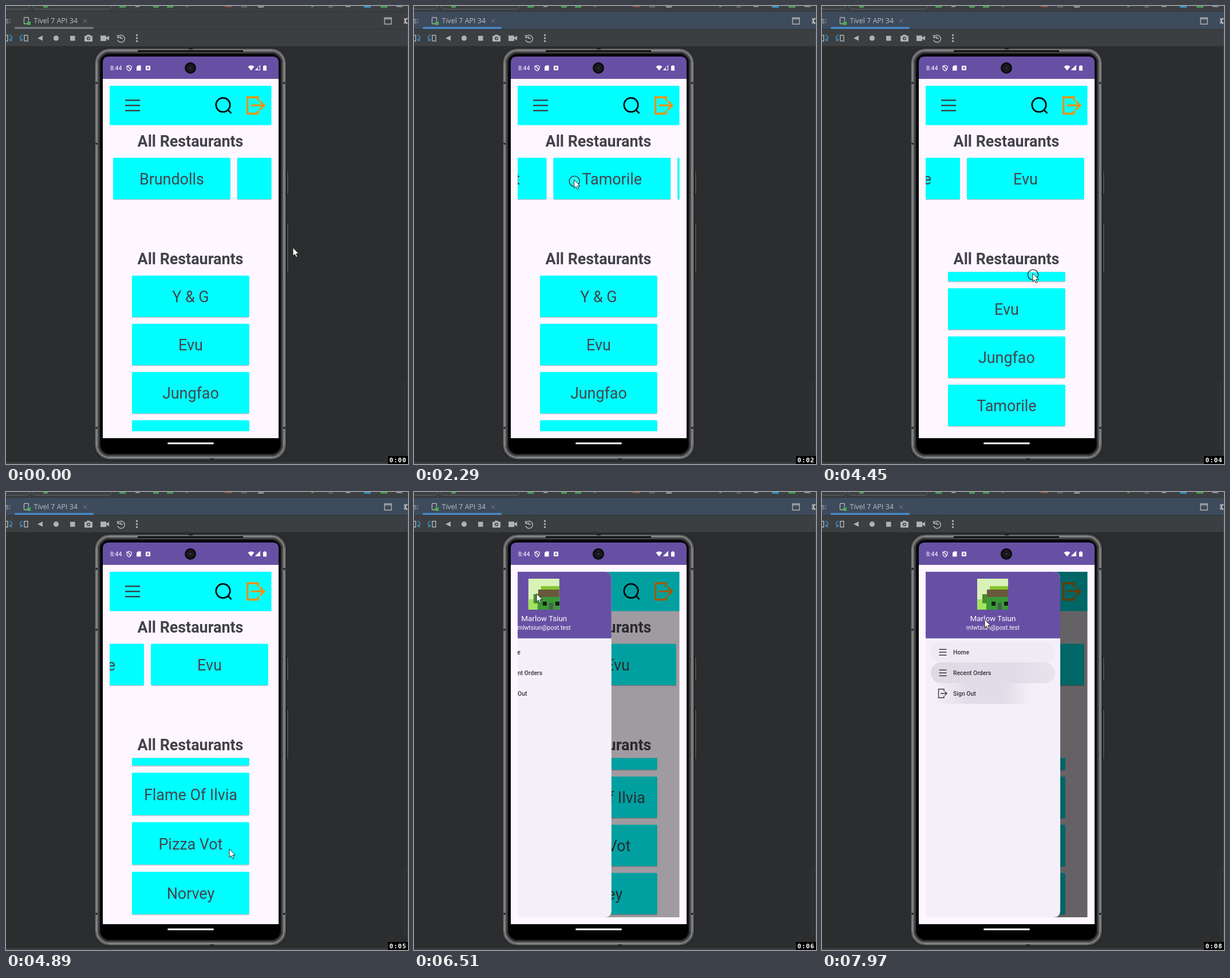
An HTML page that plays this animation: 702 by 798 pixels, repeating every 8 s.

```html
<!DOCTYPE html>
<html lang="en">
<head>
<meta charset="utf-8">
<title>Restaurant app</title>
<style>
html, body { margin: 0; width: 100%; height: 100%; overflow: hidden; background: #2b2d2f; }
svg { display: block; width: 702px; height: 798px; font-family: Roboto, sans-serif; }
.ide { font: 12.5px "Open Sans", sans-serif; fill: #bbbdbf; }
.head { font-weight: 700; font-size: 26.86px; text-anchor: middle; fill: #434249; }
.card text { font-size: 26.86px; text-anchor: middle; fill: #45444c; }
.menu { font-weight: 500; font-size: 10.45px; fill: #37343d; }
.clock { font: bold 11px "DejaVu Sans Mono", monospace; letter-spacing: .9px; fill: #fff; }
.line { fill: none; }
</style>
</head>
<body>
<svg viewBox="0 0 702 798" xmlns="http://www.w3.org/2000/svg">
  <defs>
    <clipPath id="rowClip"><rect x="181" y="262" width="282.5" height="77"/></clipPath>
    <clipPath id="colClip"><rect x="181" y="463.5" width="282.5" height="277.5"/></clipPath>
    <clipPath id="appClip"><rect x="181" y="139" width="282.5" height="602"/></clipPath>
    <linearGradient id="glow">
      <stop offset="0" stop-color="#e1dce7" stop-opacity="0"/>
      <stop offset=".35" stop-color="#e1dce7"/>
      <stop offset=".72" stop-color="#e1dce7"/>
      <stop offset="1" stop-color="#e1dce7" stop-opacity="0"/>
    </linearGradient>
    <linearGradient id="pill">
      <stop offset="0" stop-color="#dfdae4"/>
      <stop offset=".7" stop-color="#e1dce7"/>
      <stop offset="1" stop-color="#e8e3ed"/>
    </linearGradient>
  </defs>

  <!-- editor chrome -->
  <rect width="702" height="798" fill="#2b2d2f"/>
  <rect width="702" height="70" fill="#3c3f41"/>
  <g id="crumbs"></g>
  <g class="line" stroke="#626568">
    <path d="M-5 5.500H36Q40.500 5.500 40.500 0M47.500 0Q47.500 5.500 52 5.500H179Q183.500 5.500 183.500 0"/>
  </g>
  <rect id="bar" y="10" width="702" height="30"/>
  <path d="M0 9.500H702M0 40.500H702" stroke="#323436"/>
  <rect id="under" x="15" y="36.500" width="138" height="3.500" rx="1.700"/>
  <text class="ide" x="-1" y="30">s:</text>
  <text class="ide" x="48.500" y="30">Tivel 7 API 34</text>
  <path d="M134.500 22.500l7 7m0-7l-7 7" stroke="#7b7e81"/>
  <g class="line" stroke="#afb1b3" stroke-width="1.400">
    <path d="M37 31H32.500Q31.500 31 31.500 30V21Q31.500 20 32.500 20H38.500Q39.500 20 39.500 21V26"/>
    <path d="M661 20.500H673V31.500H661ZM661 22.500H673"/>
  </g>
  <rect x="37" y="27" width="6" height="6" rx="1" fill="#4caf50"/>
  <circle cx="701" cy="26" r="4" class="line" stroke="#afb1b3" stroke-width="3"/>
  <path d="M695 22l4 2M695 30l4-2" stroke="#afb1b3" stroke-width="2"/>
  <g class="line" stroke="#afb1b3" stroke-width="1.500">
    <path d="M-3 51H3V61H-3"/>
    <path d="M32 51H38V61H32Z"/>
    <path d="M195 50V55H200M195.500 54A6.300 6.300 0 1 1 195 59M200.500 53V56.500H204"/>
    <path d="M6 51Q11 52 10 57L7 60M29 51Q24 52 25 57L28 60M24 60H28V56M11 60H7V56" stroke="#3592c4"/>
  </g>
  <g fill="#afb1b3">
    <path d="M55 56L64 51.500V60.500Z"/>
    <circle cx="87.500" cy="56" r="4.600"/>
    <rect x="112" y="52" width="8.500" height="8.500"/>
    <path d="M137 52H140L141.500 50H146.500L148 52H151V62H137ZM165 51.500H175V55L180 52V60L175 57V61H165Z"/>
    <circle cx="228.500" cy="50.800" r="1.700"/><circle cx="228.500" cy="56" r="1.700"/><circle cx="228.500" cy="61.200" r="1.700"/>
  </g>
  <circle cx="144" cy="56.500" r="3" fill="#3c3f41"/><circle cx="144" cy="56.500" r="1.500" fill="#afb1b3"/>
  <path d="M702 655.500H698Q695.500 655.500 695.500 658V768Q695.500 770.500 698 770.500H702" fill="#2c2e30" stroke="#3a3c3e"/>
  <rect y="795" width="702" height="3" fill="#3c3f41"/>
  <path d="M701.500 10V798" stroke="#46494b"/>

  <!-- phone -->
  <path d="M491.500 286V329M491.500 378V467" stroke="#111" stroke-width="4"/>
  <path d="M492 287V328M492 379V466" stroke="#6b6c6e" stroke-width="1.500"/>
  <rect x="154.500" y="73.500" width="335" height="717" rx="25" fill="#000" stroke="#1d1d1e" stroke-width="1"/>
  <g class="line">
    <rect x="156" y="75" width="332" height="714" rx="24" stroke="#58595b" stroke-width="2"/>
    <rect x="158.500" y="77.500" width="327" height="709" rx="22" stroke="#838486" stroke-width="3"/>
    <rect x="161.500" y="80.500" width="321" height="703" rx="19" stroke="#48494b" stroke-width="3"/>
    <rect x="164" y="83" width="316" height="698" rx="17" stroke="#1c1c1d" stroke-width="2"/>
  </g>
  <path d="M230 78.500H414" stroke="#101011" stroke-width="3"/>
  <path d="M319 74.500H326M357 789.500H363M156 134H160M484 134H488M156 240H160M156 735H160M484 735H488" stroke="#242426" stroke-width="3"/>
  <path d="M169 127V98Q169 88 179 88H466Q476 88 476 98V127Z" fill="#6750a4"/>
  <rect x="169" y="127" width="307" height="626" fill="#fef7ff"/>
  <rect x="282" y="760.500" width="81" height="3" rx="1.500" fill="#fff"/>
  <circle cx="322" cy="108" r="10" fill="#0b0a0d"/>
  <circle cx="322" cy="108" r="6" fill="#17171b" stroke="#2b2b30"/>
  <circle cx="322" cy="108" r="2" fill="#303240"/>
  <text x="182" y="111.700" font-size="10.600" fill="#fff">8:44</text>
  <path d="M215 103.500L219 105V108Q219 111 215 113Q211 111 211 108V105ZM212 104.500L218 111" class="line" stroke="#fff" stroke-width="1.200"/>
  <path d="M230.500 103.500H235.500V112.500H228V106Z" fill="#fff"/>
  <rect x="244" y="104" width="8" height="8" rx="1" fill="#fff"/>
  <path d="M246 110.500L248 105.500L250 110.500M246.800 109H249.200" class="line" stroke="#6750a4"/>
  <path d="M422.500 105.500Q428 101.500 433.500 105.500L428 112.500Z" fill="#fff"/>
  <path d="M435.500 111.500H443.500V103.500Z" class="line" stroke="#fff"/>
  <path id="signal" fill="#fff"/>
  <path d="M449 104.500H450.500V103.500H453.500V104.500H455V112.500H449Z" fill="#fff"/>

  <!-- app -->
  <rect x="181" y="139" width="282.500" height="68.500" fill="#0ff"/>
  <path d="M208 164.300H234M208 173.300H234M208 182.300H234" stroke="#3a474d" stroke-width="2.500"/>
  <g class="line" stroke="#000" stroke-width="2.700">
    <circle cx="379" cy="172.300" r="12.200"/><path d="M387.500 181L393.500 187"/>
  </g>
  <path d="M440 165.500V159H421.700V187.500H440V181.500M428 173.200H450M443.500 166L450.700 173.200L443.500 180.500" class="line" stroke="#ff9100" stroke-width="3.300"/>
  <text class="head" x="322" y="245.300">All Restaurants</text>
  <text class="head" x="322" y="450.300">All Restaurants</text>
  <g clip-path="url(#rowClip)"><g id="row"></g></g>
  <g clip-path="url(#colClip)"><g id="col"></g></g>

  <!-- drawer -->
  <g clip-path="url(#appClip)">
    <rect id="scrim" x="181" y="139" width="283" height="602"/>
    <g id="drawer">
      <path d="M181 139H404Q416 139 416 151V729Q416 741 404 741H181Z" fill="#f4f0f9"/>
      <path d="M181 139H404Q416 139 416 151V255H181Z" fill="#6750a4"/>
      <g id="avatar"></g>
      <text x="298.500" y="224.700" font-size="13.430" text-anchor="middle" fill="#fff">Marlow Tsiun</text>
      <text x="298.500" y="240.300" font-size="10.450" text-anchor="middle" fill="#fff">mlwtsiun@post.test</text>
      <rect id="home" x="190" y="261" width="217" height="36" rx="18" fill="#e1dce7"/>
      <rect id="recent" x="190" y="297" width="217" height="36" rx="18" fill="url(#pill)"/>
      <rect id="out" x="196" y="333" width="170" height="36" fill="url(#glow)"/>
      <path d="M204.500 274.200H217.500M204.500 279.200H217.500M204.500 284.200H217.500M204.500 310.200H217.500M204.500 315.200H217.500M204.500 320.200H217.500M213 347V343.500H203.500V358.500H213V355M207 351H218M214.500 347.500L218 351L214.500 354.500" class="line" stroke="#3a3740" stroke-width="1.400"/>
      <text class="menu" x="229" y="283">Home</text>
      <text class="menu" x="229" y="319">Recent Orders</text>
      <text class="menu" x="229" y="355">Sign Out</text>
    </g>
  </g>

  <g id="cursor">
    <circle id="ring" cx=".5" cy="2.500" r="9" fill="#fff" fill-opacity=".15" stroke="#222" stroke-width="1.200"/>
    <path d="M0 0V14.500L3.300 11.500L5.700 16.700L8 15.600L5.700 10.700H10.300Z" fill="#fff" stroke="#111" stroke-width=".9"/>
  </g>
  <rect x="667" y="784" width="35" height="14" fill="#000"/>
  <text id="clock" class="clock" x="669.500" y="795"></text>
</svg>
<script>
const LOOP = 8000;
const $ = id => document.getElementById(id);
const set = (id, name, value) => $(id).setAttribute(name, value);

const card = (x, y, name) => `<g class="card">
  <rect x="${x}" y="${y + 1.5}" width="204.700" height="72" rx="2" fill="#8d8792" opacity=".5"/>
  <rect x="${x}" y="${y}" width="204.700" height="72" rx="1.500" fill="#0ff"/>
  <text x="${x + 102.4}" y="${y + 46.4}">${name}</text></g>`;
const rects = list => list.map(([x, y, w, h, c]) =>
  `<rect x="${x}" y="${y}" width="${w}" height="${h}" fill="${c}"/>`).join("");

const rowNames = ["Brundolls", "Norvey", "Flame Of Ilvia", "Pizza Vot", "Tamorile", "Evu"];
const colNames = ["Y &amp; G", "Evu", "Jungfao", "Tamorile", "Brundolls", "Flame Of Ilvia", "Pizza Vot", "Norvey"];
$("row").innerHTML = rowNames.map((n, i) => card(187 + i * 216.7, 264.5, n)).join("");
$("col").innerHTML = colNames.map((n, i) => card(220, 469.8 + i * 84, n)).join("");

$("avatar").innerHTML = rects([
  [271, 151, 54, 54, "#d9f2b8"], [271, 187, 18, 18, "#a4e35f"],
  [293, 164, 32, 10, "#85c62f"], [280, 178, 14, 16, "#4b8c2c"],
  [288, 170, 37, 14, "#69593b"], [287, 183, 38, 22, "#3a9a37"],
  [296, 191, 7, 7, "#12200f"], [318, 191, 7, 7, "#12200f"], [307, 193, 7, 12, "#47604f"]
]);
const green = "#499c54", grey = "#8b8d8f", dim = "#5c5f61";
$("crumbs").innerHTML = rects([
  [65, 0, 8, 3, green], [198, 0, 11, 3, green], [226, 0, 7, 2, grey], [257, 0, 10, 3, green],
  [281, 0, 11, 3, green], [313, 0, 6, 2, dim], [382, 0, 13, 2, "#9a4f4d"], [411, 0, 10, 3, dim],
  [440, 0, 10, 3, grey], [533, 0, 4, 2, green], [563, 0, 8, 3, dim], [593, 0, 8, 2, grey],
  [625, 0, 12, 3, "#3592c4"], [654, 0, 12, 3, green], [682, 0, 10, 2, grey]
]);

const ease = {
  lin: p => p,
  soft: p => p * p * (3 - 2 * p),
  out: p => 1 - (1 - p) ** 3,
  settle: p => 1 - (1 - p) ** 5
};
// Keys are [time, value, easing into this key].
function track(keys, t) {
  const i = keys.findIndex(k => k[0] > t);
  if (i === 0) return keys[0][1];
  if (i < 0) return keys[keys.length - 1][1];
  const [t0, a] = keys[i - 1], [t1, b, e] = keys[i];
  return a + (b - a) * ease[e || "soft"]((t - t0) / (t1 - t0));
}

const rowShift = [[700, 0], [960, 216, "lin"], [1380, 272.7, "out"], [1600, 272.7], [1780, 588, "lin"],
  [2150, 690, "out"], [2180, 690], [2440, 972, "lin"], [2800, 1017.5, "out"]];
const colShift = [[4280, 0], [4450, 61, "lin"], [4600, 232, "lin"], [4760, 394, "lin"]];
const stretch = [[4760, 1], [4870, 1.028, "out"], [4910, 1.028], [5250, 1]];
const slide = [[6408, -235], [6893, 0, "settle"]];
const path = [[310, 501, 421], [660, 440, 303], [700, 440, 303], [960, 224, 308, "lin"], [1080, 214, 310, "out"],
  [1400, 214, 310], [1560, 403, 304], [1600, 403, 304], [1780, 88, 300, "lin"], [1960, 210, 301],
  [2120, 400, 302], [2180, 400, 302], [2440, 118, 304, "lin"], [2820, 118, 304], [3340, 363.5, 460],
  [3650, 363.5, 460], [4100, 372, 528], [4280, 372, 528], [4450, 368, 467, "lin"], [4600, 362, 296, "lin"],
  [4650, 362, 296], [4870, 390, 622], [5380, 390, 622], [6120, 214, 181], [6250, 214, 177],
  [6560, 214, 177], [6700, 235, 262], [6860, 260, 312], [7030, 260, 312], [7350, 300, 345],
  [7600, 262, 275], [7830, 300, 355], [7960, 284, 222]];
const pathX = path.map(([t, x, , e]) => [t, x, e]);
const pathY = path.map(([t, , y, e]) => [t, y, e]);
const presses = [[690, 960], [1590, 1780], [2170, 2440], [4250, 4600], [6300, 6400]];

function draw(t) {
  const focused = t >= 700;
  set("bar", "fill", focused ? "#3d4b5c" : "#3c3f41");
  set("under", "fill", focused ? "#4a88c7" : "#747a80");
  set("signal", "d", t < 4000 ? "M435 112L439.500 107.500V112Z" : "M435 112H444V103Z");

  set("row", "transform", `translate(${-track(rowShift, t)})`);
  const s = track(stretch, t);
  set("col", "transform", `translate(0 ${741 * (1 - s)}) scale(1 ${s}) translate(0 ${-track(colShift, t)})`);

  // The scrim trails the drawer by about one screen refresh.
  set("drawer", "transform", `translate(${track(slide, t)})`);
  set("scrim", "opacity", .6 * (1 + track(slide, t - 17) / 235));
  set("home", "opacity", track([[6660, 0], [6720, 1], [6800, 1], [6870, .3]], t));
  set("recent", "opacity", track([[6780, 0], [6860, 1]], t));
  set("out", "opacity", track([[7140, 0], [7300, 1]], t));

  set("cursor", "transform", `translate(${track(pathX, t)} ${track(pathY, t)})`);
  set("ring", "opacity", presses.some(([a, b]) => t >= a && t <= b) ? 1 : 0);
  $("clock").textContent = "0:0" + Math.floor((t + 150) / 1000);
}

const start = performance.now();
function tick() {
  draw((performance.now() - start) % LOOP);
  requestAnimationFrame(tick);
}
tick();
</script>
</body>
</html>
```
